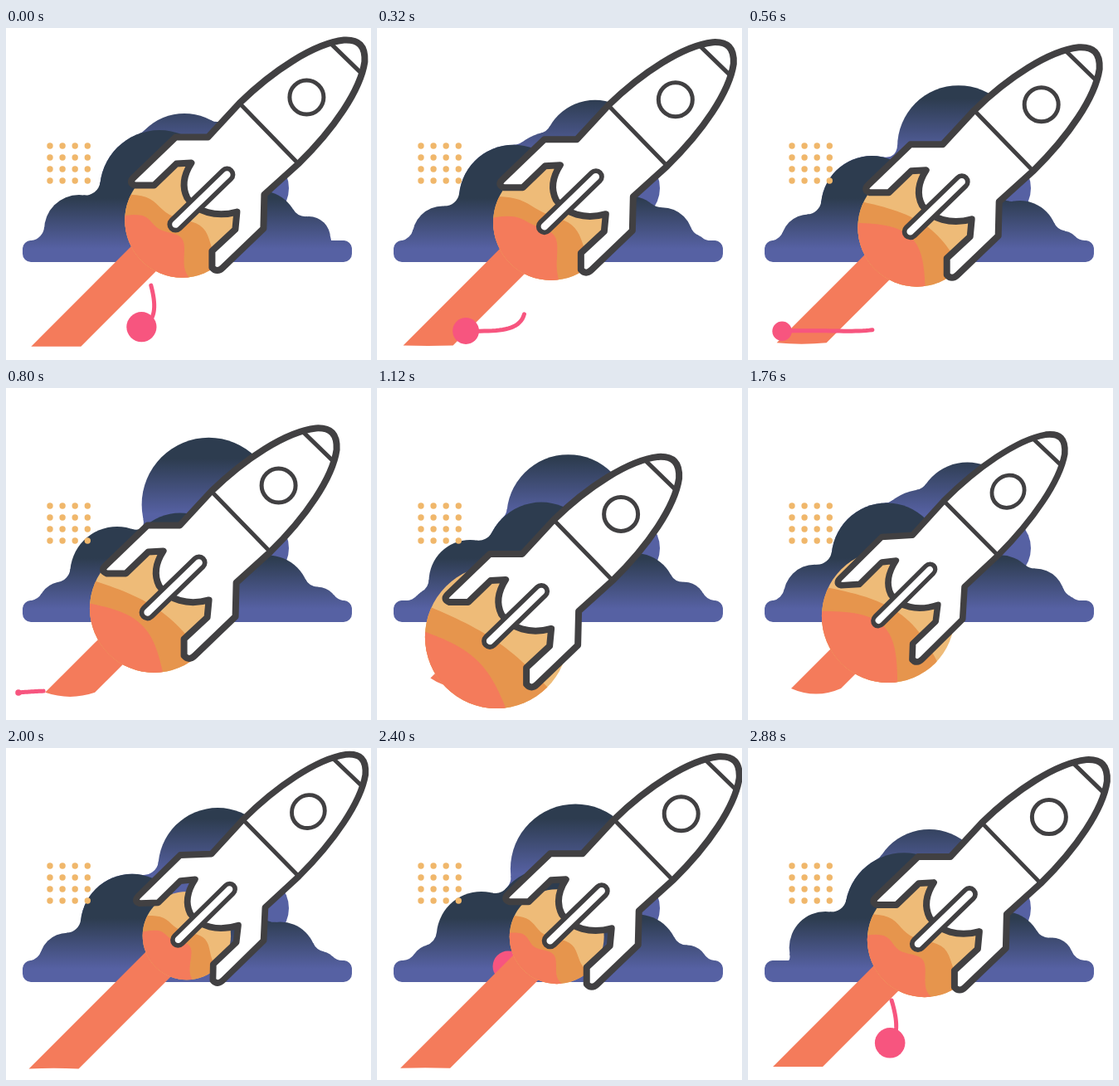
An HTML page with a canvas for the animation above (2.96 s loop, 440 px wide and 400 px high).

```html
<!DOCTYPE html>
<html lang="en">
<head>
<meta charset="utf-8">
<title>Rocket</title>
<style>
  html, body { margin: 0; width: 100%; height: 100%; overflow: hidden; background: #fff; }
  canvas { display: block; width: 440px; height: 400px; }
</style>
</head>
<body>
<canvas id="stage"></canvas>
<script>
const LOOP = 2960, STEP = 80, CLOUD_LOOP = LOOP / 2, TAU = Math.PI * 2;
const INK = '#414042', NAVY = '#2d3c4f', BLUE = '#5661a3', CORAL = '#f47b5b',
      ORANGE = '#e6954d', SAND = '#eebb78', PINK = '#f7557f', DOT = '#f0b76b';

const canvas = document.getElementById('stage');
const dpr = window.devicePixelRatio || 1;
canvas.width = 440 * dpr;
canvas.height = 400 * dpr;
const ctx = canvas.getContext('2d');
ctx.scale(dpr, dpr);
ctx.lineCap = ctx.lineJoin = 'round';

const clamp = v => Math.min(1, Math.max(0, v));
const ramp = (from, to, t) => clamp((t - from) / (to - from));
const smooth = (from, to, t) => {
  const p = ramp(from, to, t);
  return p * p * (3 - 2 * p);
};

function disc(x, y, r) {
  ctx.beginPath();
  ctx.arc(x, y, r, 0, TAU);
  ctx.fill();
}

function shade(top, bottom) {
  const g = ctx.createLinearGradient(0, top, 0, bottom);
  g.addColorStop(0, NAVY);
  g.addColorStop(1, BLUE);
  return g;
}

// Puffs drift along these routes: x, y, radius at every half cloud cycle of age.
const leftRoute = [[275, 158, 48], [247, 138, 82], [215, 170, 67], [212, 215, 62], [185, 195, 72],
  [138, 222, 58], [88, 243, 42], [68, 262, 30], [62, 266, 14]];
const rightRoute = [[382, 270, 16], [377, 265, 24], [365, 253, 26], [316, 253, 51],
  [306, 243, 47], [300, 250, 40], [300, 250, 40]];

function puff(route, age) {
  const i = Math.floor(age * 2), p = age * 2 - i;
  return route[i].map((v, k) => v + (route[i + 1][k] - v) * p);
}

// Rounds the notch above two neighbouring puffs, given from left to right.
function fillet([ax, ay, ar], [bx, by, br], r) {
  const d = Math.hypot(bx - ax, by - ay), a = ar + r, b = br + r;
  if (d >= a + b || d <= Math.abs(a - b)) return;
  const dir = Math.atan2(by - ay, bx - ax) - Math.acos((a * a + d * d - b * b) / (2 * a * d));
  const x = ax + a * Math.cos(dir), y = ay + a * Math.sin(dir);
  ctx.beginPath();
  ctx.moveTo(ax, ay);
  ctx.arc(x, y, r, dir + Math.PI, Math.atan2(by - y, bx - x), true);
  ctx.lineTo(bx, by);
  ctx.fill();
}

function drawPuffs(puffs) {
  puffs.forEach((p, i) => {
    disc(...p);
    if (i) fillet(puffs[i - 1], p, 18);
  });
}

function drawCloud(t) {
  const phase = t % CLOUD_LOOP / CLOUD_LOOP;
  const left = [[32, 268, 12], ...[3, 2, 1, 0].map(n => puff(leftRoute, phase + n))];
  const right = [...[2, 1, 0].map(n => puff(rightRoute, phase + n)), [405, 268, 12]];
  const split = phase < .4 ? 3 : 4;
  ctx.save();
  ctx.beginPath();
  ctx.rect(0, 0, 440, 282);
  ctx.clip();
  ctx.fillStyle = BLUE;
  disc(300, 193, 41);
  ctx.fillStyle = shade(85, 152);
  drawPuffs(left.slice(split - 1));
  ctx.fillStyle = shade(205, 266);
  drawPuffs(left.slice(0, split));
  drawPuffs(right);
  ctx.fillRect(110, 236, 240, 46);
  ctx.beginPath();
  ctx.roundRect(20, 256, 397, 26, 10);
  ctx.fill();
  ctx.restore();
}

function drawDots() {
  ctx.fillStyle = DOT;
  for (let i = 0; i < 16; i++) disc(53 + i % 4 * 15.1, 142 + (i >> 2) * 14, 3.7);
}

// Distance slid back along the flight axis: slow drift, dip, launch.
function slideAt(t) {
  const dip = smooth(410, 1260, t) * (1 - smooth(1580, 2010, t));
  const hover = t < 1500 ? Math.min(3.5, .6 + .008 * t) : .008 * Math.max(0, t - 2240) - 5;
  return hover + (74 - hover) * dip;
}

function drawTrail(d, x, y) {
  const left = 414, right = 474, end = 384 - d / 2;
  ctx.fillStyle = CORAL;
  ctx.beginPath();
  ctx.moveTo(left - y, y);
  ctx.lineTo(left - end, end);
  ctx.quadraticCurveTo((left + right) / 2 - end, end + d * .3, right - end, end);
  ctx.lineTo(x, right - x);
  ctx.fill();
}

function cometPath(u) {
  const v = 1 - u;
  const bezier = (a, b, c, d) => v * v * v * a + 3 * v * v * u * b + 3 * v * u * u * c + u * u * u * d;
  return [bezier(158, 215, 150, 15), bezier(263, 400, 355, 367)];
}

// A ball that pulls its string along one curve and shrinks away.
function cometAt(t) {
  const life = (t + LOOP - 2400) % LOOP / 1440;
  const head = Math.min(1, life * 1.2);
  return { head, tail: Math.min(head, .08 + life ** 3), r: 18.5 * (1 - life ** 4) };
}

function drawComet({ head, tail, r }) {
  if (r <= 0) return;
  ctx.fillStyle = ctx.strokeStyle = PINK;
  ctx.lineWidth = 5;
  ctx.beginPath();
  for (let i = 0; i <= 20; i++) ctx.lineTo(...cometPath(tail + (head - tail) * i / 20));
  ctx.stroke();
  disc(...cometPath(head), r);
}

// Fills the lower left of the fireball below a bulging, rippled edge.
function fillWave(r, [ax, ay], [bx, by], bulge, ripple, color) {
  ctx.fillStyle = color;
  ctx.beginPath();
  for (let i = 0; i <= 30; i++) {
    const u = i / 30;
    const lift = bulge * Math.sin(Math.PI * u) + ripple * Math.sin(4 * Math.PI * u);
    ctx.lineTo(r * (ax + (bx - ax) * u + lift * .73), r * (ay + (by - ay) * u - lift * .68));
  }
  ctx.lineTo(r * bx, 2 * r);
  ctx.lineTo(-2 * r, 2 * r);
  ctx.lineTo(-2 * r, r * ay);
  ctx.fill();
}

function drawFireball(t, d, x, y) {
  const r = 69 + d / 4 + 3 * Math.min(d, 0);
  const bulge = .36 + .14 * Math.sin(TAU * t / CLOUD_LOOP);
  const ripple = .08 * clamp(1 - d / 8);
  ctx.save();
  ctx.translate(x, y);
  ctx.fillStyle = SAND;
  disc(0, 0, r);
  ctx.clip();
  fillWave(r, [-1, -.45], [.8, .8], bulge * .7, ripple, ORANGE);
  fillWave(r, [-1.02, -.08], [.14, 1.02], bulge, ripple, CORAL);
  ctx.restore();
}

const body = new Path2D(`M244 131 L282 90 C322 51 372 18 408 14 C426 13 434 21 433 40
  C428 74 396 121 353 163 L312 200 L311 241 L262 288 Q255 295 249 288 L249 268 L277 242
  L279 221 C254 228 230 221 219 204 C212 190 215 176 224 162 L206 163 L179 189 L156 189
  Q148 186 154 180 L205 131 Z`);
const seams = new Path2D('M282 90 L353 163 M393 19 L428 53');
const fin = new Path2D('M205 236 L267 176');

function drawRocket(t, d) {
  const sway = Math.sin(Math.PI * ramp(1300, 2200, t));
  ctx.save();
  ctx.translate(260 - d - 4 * sway, 183 + d - sway);
  ctx.rotate(-Math.PI / 4 - .0125 * sway);
  ctx.scale(1, 1 - .09 * sway);
  ctx.rotate(Math.PI / 4);
  ctx.translate(-260, -183);
  ctx.fillStyle = '#fff';
  ctx.strokeStyle = INK;
  ctx.lineWidth = 8;
  ctx.fill(body);
  ctx.stroke(body);
  ctx.lineWidth = 5;
  ctx.stroke(seams);
  ctx.beginPath();
  ctx.arc(363, 83, 20.5, 0, TAU);
  ctx.stroke();
  ctx.lineWidth = 20;
  ctx.stroke(fin);
  ctx.strokeStyle = '#fff';
  ctx.lineWidth = 8.5;
  ctx.stroke(fin);
  ctx.restore();
}

function draw(t) {
  const d = slideAt(t), x = 213 - d, y = 231 + d;
  const comet = cometAt(t), cometInFront = comet.head > .5;
  ctx.fillStyle = '#fff';
  ctx.fillRect(0, 0, 440, 400);
  drawCloud(t);
  drawDots();
  if (!cometInFront) drawComet(comet);
  drawTrail(d, x, y);
  if (cometInFront) drawComet(comet);
  drawFireball(t, d, x, y);
  drawRocket(t, d);
}

const start = performance.now();
function tick() {
  const t = (performance.now() - start) % LOOP;
  draw(Math.floor(t / STEP) * STEP);
  requestAnimationFrame(tick);
}
tick();
</script>
</body>
</html>
```
